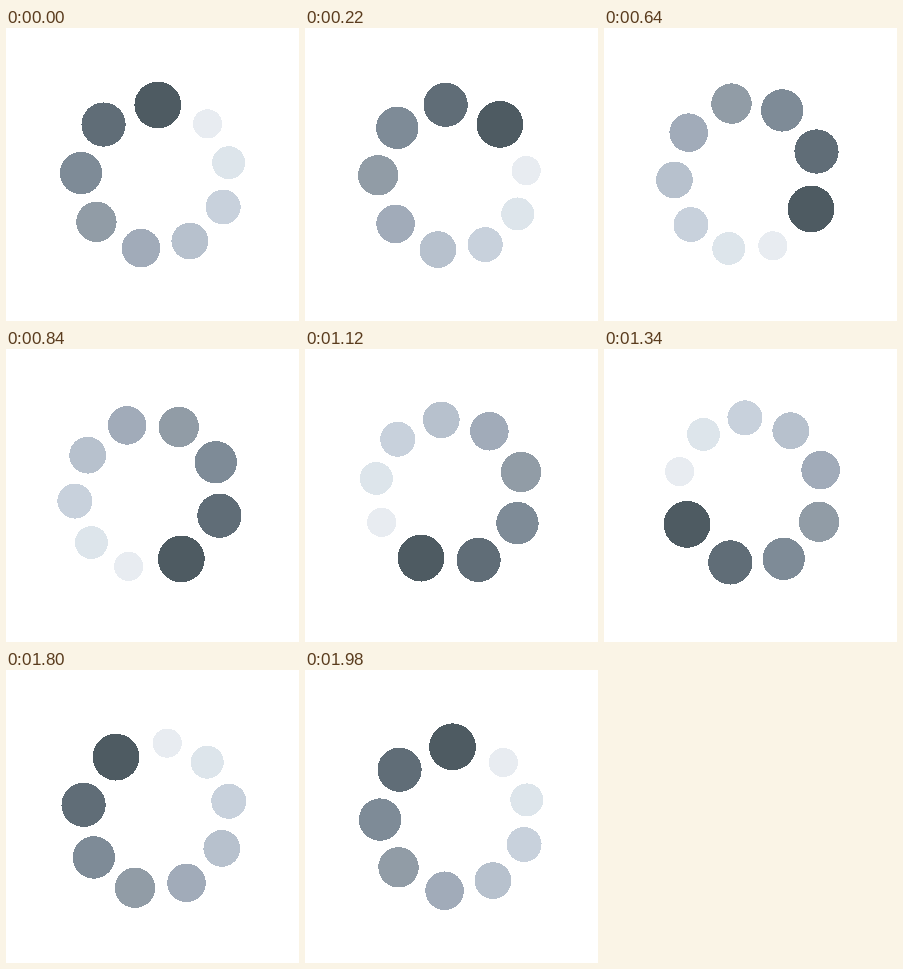
These frames come from a looping animation (293x293 px, 2 s). An HTML page:

```html
<!DOCTYPE html>
<html lang="en">
<head>
<meta charset="utf-8">
<title>Loading spinner</title>
<style>
  html, body { margin: 0; width: 100%; height: 100%; overflow: hidden; background: #fff; }
  svg { display: block; width: 100vw; height: 100vh; }
</style>
</head>
<body>
<svg viewBox="0 0 293 293" shape-rendering="crispEdges">
  <g id="ring"></g>
</svg>
<script>
  const CENTER = 146.5;
  const LOOP = 2000;
  const STEP = 20;

  // angle clockwise from the top (degrees), distance from center, radius, colour
  const dots = [
    [4.4, 69.7, 23.4, '#4e5b62'],
    [315.6, 69.9, 22.1, '#606d77'],
    [271.1, 71.5, 21.2, '#7e8b97'],
    [229.8, 73.4, 20.2, '#919ca6'],
    [188.9, 74.6, 19.3, '#a1abb9'],
    [150.7, 76.3, 18.4, '#b7c1cd'],
    [114.7, 77.8, 17.5, '#c8d1dc'],
    [81.2, 77.1, 16.5, '#dde5eb'],
    [47.4, 74.8, 14.6, '#e8ecf1']
  ];

  const ring = document.getElementById('ring');
  for (const [angle, distance, radius, fill] of dots) {
    const a = angle * Math.PI / 180;
    const dot = document.createElementNS('http://www.w3.org/2000/svg', 'circle');
    dot.setAttribute('cx', CENTER + distance * Math.sin(a));
    dot.setAttribute('cy', CENTER - distance * Math.cos(a));
    dot.setAttribute('r', radius);
    dot.setAttribute('fill', fill);
    ring.append(dot);
  }

  function draw(elapsed) {
    const time = Math.floor((elapsed % LOOP) / STEP) * STEP;
    ring.setAttribute('transform', `rotate(${time / LOOP * 360} ${CENTER} ${CENTER})`);
  }

  const start = performance.now();
  function tick() {
    draw(performance.now() - start);
    requestAnimationFrame(tick);
  }
  tick();
</script>
</body>
</html>
```
